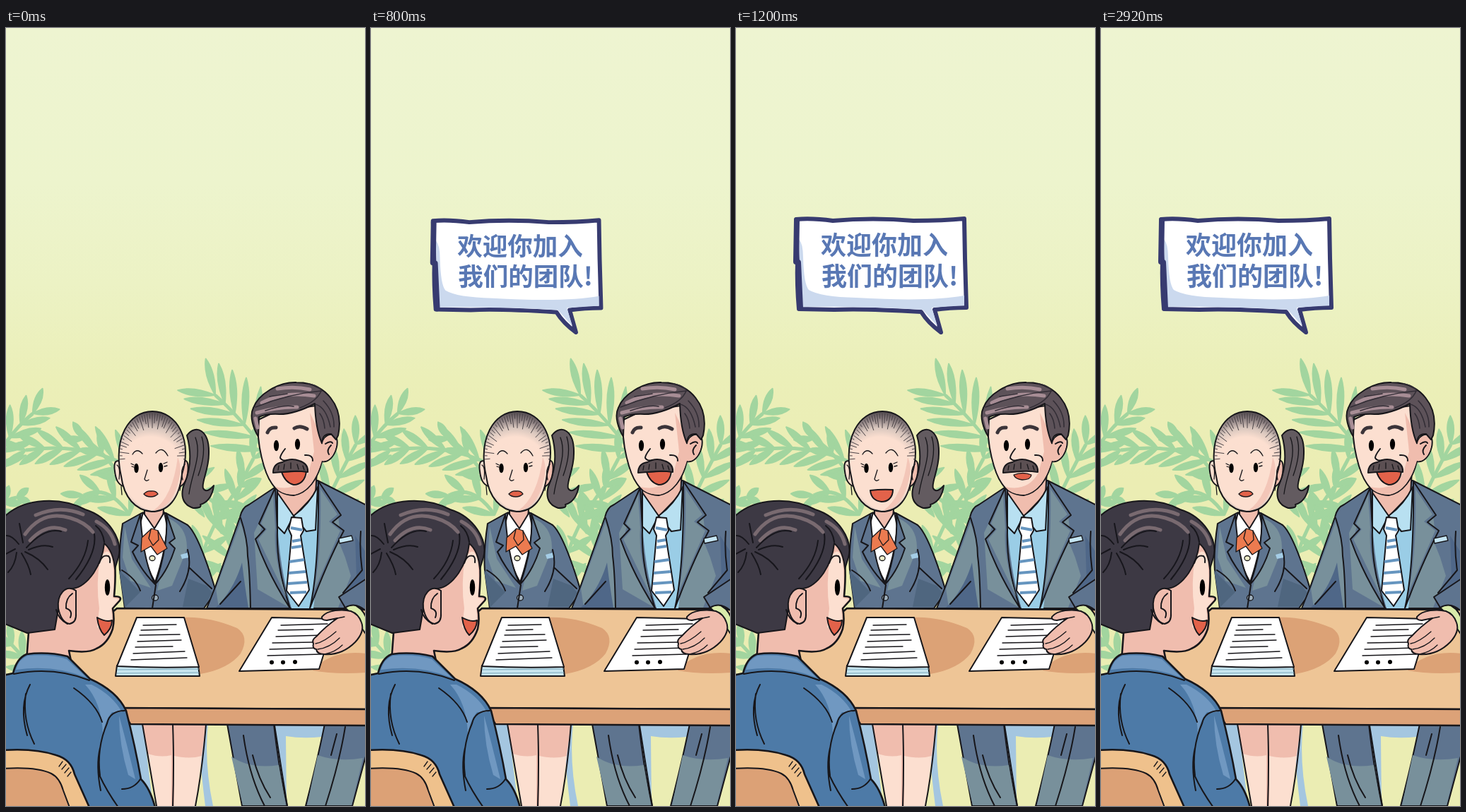
These frames come from a looping animation (508x1102 px, 3000 ms). An HTML page:

```html
<!DOCTYPE html>
<html lang="zh">
<head>
<meta charset="utf-8">
<title>Interview</title>
<style>
html, body { margin: 0; width: 100%; height: 100%; overflow: hidden; background: #ecedb1; }
svg { display: block; width: 508px; height: 1102px; }
.ink { stroke: #17161a; stroke-width: 2; stroke-linejoin: round; stroke-linecap: round; }
.line { fill: none; }
.thin { stroke-width: 1.3; }
.bold { stroke-width: 2.6; }
.skin { fill: #fcdfd0; }
.blush { fill: #f0bdae; }
.suit { fill: #5e748f; }
.grey { fill: #78909b; }
.deep { fill: #4f6788; }
.lip { fill: #e2624a; }
#leaves { fill: #a2d59f; stroke: #a2d59f; stroke-linejoin: round; }
#strands { fill: none; stroke: #4a4347; }

/* Anchored at the tip of the tail */
#bubble { transform-origin: 290px 435px; animation: pop 3s linear infinite; }
@keyframes pop {
  0%, 15.27% { transform: scale(0); }
  29.17% { transform: scale(1.2); }
  36.17%, 100% { transform: scale(1); }
}
#bubble text { font: 700 36px "Noto Sans CJK SC", "Noto Sans CJK", sans-serif; fill: #5978b4; }

.her.open { animation: herTalk 3s step-end infinite; }
.her.shut { animation: herRest 3s step-end infinite; }
.his.open { animation: hisTalk 3s step-end infinite; }
.his.shut { animation: hisRest 3s step-end infinite; }
@keyframes herTalk {
  0%, 25.333%, 46.667%, 66.667%, 73.333%, 93.333% { opacity: 0; }
  12%, 33.333%, 54.667%, 72%, 81.333% { opacity: 1; }
}
@keyframes herRest {
  0%, 25.333%, 46.667%, 66.667%, 73.333%, 93.333% { opacity: 1; }
  12%, 33.333%, 54.667%, 72%, 81.333% { opacity: 0; }
}
@keyframes hisTalk {
  0%, 21.333%, 42.667%, 64%, 90.667% { opacity: 1; }
  10.667%, 32%, 53.333%, 80% { opacity: 0; }
}
@keyframes hisRest {
  0%, 21.333%, 42.667%, 64%, 90.667% { opacity: 0; }
  10.667%, 32%, 53.333%, 80% { opacity: 1; }
}
</style>
</head>
<body>
<svg viewBox="0 0 508 1102">
<defs>
  <linearGradient id="sky" x1="0" y1="0" x2="0" y2="1">
    <stop offset="0" stop-color="#eef4d1"/>
    <stop offset=".2" stop-color="#edf4cd"/>
    <stop offset=".33" stop-color="#ecf2c4"/>
    <stop offset=".45" stop-color="#ebefb8"/>
    <stop offset=".58" stop-color="#ebedb3"/>
    <stop offset="1" stop-color="#ebedb3"/>
  </linearGradient>
  <radialGradient id="scalp" gradientUnits="userSpaceOnUse" cx="204" cy="625" r="82">
    <stop offset=".56" stop-color="#fcdfd0"/>
    <stop offset=".72" stop-color="#d8c6bd"/>
    <stop offset=".88" stop-color="#85797b"/>
    <stop offset="1" stop-color="#4d464a"/>
  </radialGradient>
</defs>
<rect width="508" height="1102" fill="url(#sky)"/>
<g id="leaves"></g>

<!-- seats behind the table -->
<path fill="#a4c6e0" d="M176 985H194L208 1102H196ZM272 985H286Q280 1040 293 1102H282Q274 1040 272 985ZM380 986H452L447 1004Q420 1007 396 1003L397 1102H386Z"/>

<!-- legs -->
<path class="blush" d="M193 985H283L268 1102H213Z"/>
<path class="skin" d="M201 1028Q218 1034 234 1030V1102H213ZM238 1031Q260 1036 277 1031L268 1102H238Z"/>
<path class="ink line" d="M193 986L213 1102M236 986Q238 1040 236 1102M283 986Q278 1050 268 1102"/>
<path class="suit ink" d="M313 986H379Q386 1050 398 1102H334ZM451 986H510V1028L490 1102H424Q440 1040 451 986Z"/>
<path class="grey" d="M319 1032Q345 1050 386 1044L396 1101H335ZM441 1030Q470 1040 505 1034L489 1101H426Z"/>
<path class="ink line" d="M336 1002Q344 1060 366 1102M480 990Q472 1040 452 1102M380 988L398 1102M349 1030Q357 1064 374 1090M468 1000L460 1030"/>

<!-- woman -->
<g>
  <path class="ink" fill="#635b60" d="M256 577C269 560 288 570 287 603C287 626 276 644 279 652C283 659 290 653 294 648C292 665 283 673 275 675Q278 680 265 680C249 675 246 661 253 644C260 627 264 606 256 577Z"/>
  <path class="ink line thin" d="M268 580C278 606 262 633 259 660M277 579Q284 601 272 634"/>
  <path class="suit ink" d="M192 687L165 702Q159 742 161 768L168 822H280L297 798Q273 718 257 704L226 687Z"/>
  <path class="grey" d="M229 694Q257 706 256 738L235 790L214 797L226 740ZM168 706L178 752L205 793L176 783L165 750Z"/>
  <path fill="#4f667f" d="M160 768L190 799L168 821ZM258 780L284 790L292 800L280 820H250Z"/>
  <path class="blush ink" d="M196 668V697L209 710L222 695L224 668Z"/>
  <path fill="#fff" class="ink" d="M194 686L188 710Q195 758 211 785Q226 741 228 706L224 686L210 709Z"/>
  <path class="suit ink" d="M190 689L177 728L187 733L179 742Q191 768 211 788Q194 755 190 689ZM227 688L239 723L231 729L239 737Q229 769 211 788Q230 735 227 688Z"/>
  <path fill="#ec7b50" class="ink thin" d="M206 709L192 722L191 742L205 734L214 746L228 737L215 712Z"/>
  <path class="ink line thin" d="M205 710L202 723L208 733L216 725L215 712"/>
  <ellipse class="ink thin" fill="#f1f0ca" cx="207" cy="751" rx="4" ry="3.5"/>
  <ellipse class="ink thin" fill="#9fb0bd" cx="211" cy="807" rx="4.5" ry="4"/>
  <path fill="#a4cde6" d="M247 746L258 743L259 750L249 752Z"/>
  <path class="ink line" d="M257 739Q265 768 246 798M260 765L291 794M164 768Q184 780 190 797M212 789L207 822"/>
  <path class="skin ink" d="M165 617C155 608 152 616 154 628Q156 646 166 649Z"/>
  <path class="blush ink" d="M246 616C257 607 259 617 257 631Q254 648 244 650Z"/>
  <path class="ink" fill="url(#scalp)" d="M163 635C151 581 174 543 207 543C242 543 264 583 249 632C245 668 229 685 206 685C183 683 167 665 163 635Z"/>
  <path class="skin" d="M166 612C171 594 186 588 208 588C229 588 243 597 247 617C248 650 233 682 207 683C184 681 168 660 166 612Z"/>
  <path class="blush" d="M243 608Q248 618 246 632C242 660 229 682 208 684Q236 664 243 608Z" opacity=".7"/>
  <g id="strands"></g>
  <path class="ink line thin" d="M179 604Q185 594 193 603M212 602Q221 591 229 606M177 617L181 619M223 617L228 615M178 621L181 622M224 621L228 620M200 626L196 639Q198 643 202 640M163 649L164 661M247 649L246 655M157 619Q162 622 160 639M253 618Q246 626 250 640"/>
  <ellipse cx="184.500" cy="623.500" rx="3.200" ry="6.800"/>
  <ellipse cx="219" cy="622.500" rx="3.200" ry="6.800"/>
  <path class="her shut lip ink thin" d="M195 660Q200 655 205 656Q212 655 215 660Q211 664 205 664Q198 664 195 660Z"/>
  <path class="her open lip ink" d="M190 655Q206 653 222 654C222 667 213 671 206 671C196 670 191 664 190 655Z"/>
</g>

<!-- man -->
<g>
  <path class="suit ink" d="M383 649L344 675Q334 679 331 693L296 792L284 822H510V676L441 641Z"/>
  <path class="grey" d="M332 700L342 734L347 821H301L297 794ZM377 661L360 713L369 756L401 821L356 795L351 715ZM443 652L470 690L473 718L444 783L434 821H470L488 776L480 750L468 720Z"/>
  <path class="deep" d="M334 757Q323 795 297 821H343Q337 785 334 757ZM494 719L510 744V798L478 803L496 779Z"/>
  <path fill="#9acde6" d="M384 657Q381 745 404 822H435Q445 750 441 650Z"/>
  <path class="blush ink" d="M385 635L384 662L406 693L438 660L440 626Z"/>
  <path fill="#b8e0f1" class="ink" d="M384 658L384 706L394 716L407 691L425 713L438 711L441 650Q429 675 407 691Z"/>
  <path fill="#fff" class="ink" d="M404 693L418 694L421 712L417 719L429 796L414 819L397 797L404 719L400 710Z"/>
  <path fill="none" stroke="#6595bf" stroke-width="4" d="M403 708L419 711M405 727L417 725M404 736L418 734M401 756L422 753M400 772L424 770M399 787L426 785M402 800L425 799"/>
  <path class="suit ink" d="M381 651L358 702L366 710L353 724Q371 774 402 822Q382 762 384 711ZM442 642L474 690L462 700L478 712Q454 758 430 822Q443 767 442 642Z"/>
  <path class="grey" d="M378 661L361 702L369 710L357 724L397 806Q378 750 381 708ZM445 653L469 689L457 699L473 712L436 797Q447 735 445 653Z"/>
  <path fill="#c5e5f3" class="ink thin" d="M471 723L489 719L491 726L472 730Z"/>
  <path class="ink line" d="M332 694Q342 724 342 748Q345 770 346 822M332 784L303 816M502 713Q500 741 504 768L477 800"/>
  <path class="skin ink" d="M357 555C354 590 366 631 376 645Q386 661 407 662C427 659 441 639 447 614C465 618 476 580 463 576Q451 574 447 590L438 535L380 544Z"/>
  <path class="blush" d="M430 545L440 565L447 590Q451 575 463 578C473 589 462 616 447 613C440 638 427 657 409 661Q390 662 381 650Q413 657 428 630L436 600L433 572Z"/>
  <path class="ink" fill="#5d5259" d="M357 579C350 567 344 550 350 538C357 519 385 501 411 502C452 502 479 535 470 577L467 583L460 575Q448 574 447 588Q438 568 437 532Q409 547 387 547Q369 546 358 551Z"/>
  <path fill="none" stroke="#a78d95" stroke-width="5" stroke-linecap="round" d="M362 531Q392 514 436 521M384 511Q408 507 430 512M355 545Q386 536 412 537M353 553L356 566"/>
  <path fill="none" stroke="#332e36" stroke-width="1.600" stroke-linecap="round" d="M353 537Q400 518 446 514Q440 529 416 538M438 533Q453 537 459 565M449 528Q465 545 464 565M373 522L398 518M367 542Q393 533 407 536M444 546Q450 554 451 567M447 514Q442 506 428 504"/>
  <path class="ink line" d="M452 589Q460 584 462 588M460 591Q453 598 457 604M395 596Q388 605 388 609Q391 614 398 612M423 605Q434 604 434 613"/>
  <path fill="none" stroke="#3b3439" stroke-width="5" stroke-linecap="round" d="M370 573Q373 565 382 566M408 567Q416 562 426 568"/>
  <ellipse cx="382.500" cy="591.500" rx="3.600" ry="7.800"/>
  <ellipse cx="412.500" cy="589.500" rx="3.600" ry="7.800"/>
  <path class="his shut lip ink thin" d="M393 633Q406 628 418 633Q417 640 405 640Q395 639 393 633Z"/>
  <path class="his open lip ink" d="M390 629L425 627C424 641 416 647 407 647Q395 644 390 629Z"/>
  <path class="ink" fill="#5c5053" d="M378 630Q378 617 391 615Q403 608 415 613Q428 617 427 629Q414 627 403 628Q390 629 378 630Z"/>
  <path class="ink line thin" d="M386 620L385 626M394 618L393 625M403 616V624M412 618L414 625M420 620L422 626"/>
</g>

<!-- table -->
<path fill="#eec596" class="ink bold" d="M157 822L510 824V965L88 963V880Z"/>
<path fill="#dca278" class="ink bold" d="M162 963L510 965V988L176 986Z"/>
<path fill="#dca276" d="M250 835Q286 833 327 850Q345 862 332 886Q315 908 275 915ZM434 910Q460 880 510 886V913Q465 916 434 910Z"/>
<path fill="#c9e6ef" class="ink" d="M157 903L155 918H274L272 903Z"/>
<path fill="none" stroke="#7ba9bd" d="M157 909L273 908M157 914L273 913"/>
<path fill="#fff" class="ink" d="M185 835H252L273 905Q215 907 157 904Z"/>
<path class="ink line thin" d="M194 846L241 845M191 853L229 852M189 860L246 859M186 869L248 867M183 877L236 876M180 886L253 883M177 895L256 892"/>
<path fill="#fff" class="ink" d="M376 835L465 837L443 908L330 911Z"/>
<path class="ink line thin" d="M389 846L455 844M385 853L435 852M382 862L449 860M377 871L434 870M373 880L444 878M370 889L446 887"/>
<g><circle cx="376" cy="898.500" r="3"/><circle cx="392" cy="898.500" r="3"/><circle cx="409" cy="898" r="3"/></g>

<!-- hand on the sheet -->
<path fill="#d9ebaa" class="ink" d="M479 820L488 815Q504 820 510 836V860L493 834Z"/>
<path class="suit ink" d="M471 806L510 780V826Q494 812 480 821Z"/>
<path class="blush ink" d="M488 826C476 823 455 824 447 834Q446 839 454 839L469 836Q453 847 439 862Q432 867 435 872Q433 879 439 880Q440 887 450 887Q475 889 494 870Q508 855 503 842Q499 830 488 826Z"/>
<path class="ink line thin" d="M469 836L479 834M438 872Q450 870 467 855M441 880Q458 878 472 864M451 887Q466 884 476 874"/>

<!-- young man -->
<g>
  <path class="blush ink bold" d="M33 842L29 896L94 906L89 882Q117 886 128 879Q144 872 151 851Q154 837 151 822L161 811Q165 805 153 805Q157 764 151 737L128 706Q60 720 33 842Z"/>
  <path class="skin" d="M133 751Q146 730 151 755Q154 780 151 807L160 809L149 822Q151 839 148 850Q135 856 129 848L132 822Q127 788 133 751Z"/>
  <path class="ink" fill="#3d3944" d="M-4 694C26 663 80 665 112 682C145 692 166 725 159 750L154 766Q152 741 139 730Q137 752 124 772Q110 792 95 794C80 793 77 806 74 823L69 852L30 857L-4 843Z"/>
  <path fill="none" stroke="#796a70" stroke-width="5" stroke-linecap="round" d="M27 717Q52 682 91 694Q112 700 123 714M42 690Q77 675 109 689M34 726Q58 700 84 711M128 699Q149 710 154 731"/>
  <path fill="none" stroke="#17161c" stroke-width="2" stroke-linecap="round" d="M29 736Q55 707 78 713M32 739Q52 730 66 735M27 742Q48 751 59 767M22 744Q33 762 35 774M15 743Q13 761 3 771M13 738L-2 746M18 731Q8 718 0 719M24 729L19 702M125 717Q129 744 99 781M116 726Q113 754 89 780M139 728Q137 713 127 705"/>
  <path class="blush ink" d="M99 797C84 787 72 803 74 822Q78 842 90 844Q100 842 99 829Z"/>
  <path class="ink line" d="M94 801Q84 808 85 822Q95 825 91 835M132 758Q136 745 145 748Q148 751 147 757M71 824Q74 837 87 844"/>
  <ellipse cx="143.500" cy="792.500" rx="3.700" ry="11.500"/>
  <path class="lip ink" d="M129 835Q141 842 150 839Q150 851 139 860Q131 852 129 835Z"/>
  <path fill="#4d7aa7" class="ink bold" d="M-4 917L10 914Q15 893 29 887Q58 883 87 890L119 922Q157 939 170 967Q183 1018 191 1064Q204 1077 211 1104H-4Z"/>
  <path fill="#7098c1" d="M14 909Q18 894 31 889Q65 887 86 894L114 920Q67 901 14 909ZM121 930Q151 945 164 969L150 969Q140 980 137 1001Q136 956 112 930ZM160 974Q170 1010 183 1064L173 1058Q160 1015 160 974Z"/>
  <path class="ink line" d="M11 915Q67 904 118 924M34 930Q18 960 30 1002M28 943Q23 980 40 1014M168 967Q147 967 143 985Q128 1020 133 1059M133 1020Q127 1045 134 1080M96 935Q128 957 136 983M190 1064Q181 1078 164 1078M132 1058Q142 1080 159 1104"/>
  <path fill="#efc18c" class="ink bold" d="M-4 1023Q41 1020 71 1030Q92 1036 97 1057L118 1104H-4Z"/>
  <path fill="#dca176" class="ink" d="M-4 1049Q43 1046 64 1056Q76 1062 81 1080L90 1104H-4Z"/>
  <path class="ink line thin" d="M75 1046L80 1039M79 1050L85 1043M83 1055L89 1048M87 1060L92 1054"/>
</g>

<g id="bubble">
  <path fill="#fff" stroke="#373b70" stroke-width="6" stroke-linejoin="round" d="M85 271Q108 269 137 273Q194 268 251 273Q294 273 323 270L324 326L326 396Q302 396 281 399L290 431Q272 418 262 402Q180 397 139 399L89 398Q86 363 87 330Z"/>
  <path fill="#cbd9ee" d="M89 299Q95 306 95 325Q96 363 103 371Q120 381 170 382Q274 388 323 379L323 393L277 396L285 422L264 399Q180 394 92 395Z"/>
  <path fill="none" stroke="#373b70" stroke-width="8" stroke-linecap="round" d="M86 273L85 331M88 332L91 397"/>
  <text x="120" y="320.500">欢迎你加入</text>
  <text x="121" y="364.500">我们的团队!</text>
</g>
</svg>
<script>
const add = (id, d, attrs) => {
  const p = document.createElementNS("http://www.w3.org/2000/svg", "path");
  p.setAttribute("d", d);
  for (const k in attrs) p.setAttribute(k, attrs[k]);
  document.getElementById(id).append(p);
};

const leaflet = (x, y, a, len, w) => {
  const c = Math.cos(a), s = Math.sin(a);
  const at = (u, v) => `${(x + c * u - s * v).toFixed(1)} ${(y + s * u + c * v).toFixed(1)}`;
  return `M${at(0, 0)}Q${at(len * .6, w)} ${at(len, 0)}Q${at(len * .6, -w)} ${at(0, 0)}Z`;
};

// Leaflets in pairs along a quadratic stem
function frond(x0, y0, cx, cy, x1, y1, pairs, len, spread = .75) {
  let d = "";
  for (let i = 0; i <= pairs; i++) {
    const t = i / pairs, u = 1 - t;
    const x = u * u * x0 + 2 * u * t * cx + t * t * x1;
    const y = u * u * y0 + 2 * u * t * cy + t * t * y1;
    const a = Math.atan2(u * (cy - y0) + t * (y1 - cy), u * (cx - x0) + t * (x1 - cx));
    const l = len * (1 - .3 * t);
    for (const side of [-1, 1]) d += leaflet(x, y, a + side * spread * (1 - .3 * t), l, 9);
  }
  add("leaves", d, { "stroke-width": 2 });
  add("leaves", `M${x0} ${y0}Q${cx} ${cy} ${x1} ${y1}`, { "stroke-width": 5, fill: "none" });
}

frond(-22, 625, 2, 575, 38, 546, 4, 54);
frond(175, 622, 110, 586, 28, 598, 6, 56, .7);
frond(165, 640, 135, 595, 110, 582, 2, 40);
frond(366, 598, 330, 550, 296, 520, 5, 76, .85);
frond(445, 690, 470, 635, 495, 590, 4, 58);
frond(330, 780, 300, 700, 350, 610, 6, 58);
frond(250, 650, 300, 660, 330, 720, 4, 52);
frond(270, 790, 275, 720, 330, 650, 3, 46);
frond(175, 690, 145, 645, 110, 662, 3, 46);
frond(-20, 690, -5, 668, 15, 665, 2, 30);
frond(40, 910, 15, 880, -5, 860, 3, 40);

// Combed-back hair radiating from the brow
let strands = "";
for (let i = 0; i <= 40; i++) {
  const a = Math.PI * (.98 + 1.04 * i / 40);
  const inner = .74 + .12 * Math.sin(i * 2.4) + .08 * Math.abs(Math.cos(a));
  const at = k => `${(207 + 47 * k * Math.cos(a)).toFixed(1)} ${(607 + 62 * k * Math.sin(a)).toFixed(1)}`;
  strands += `M${at(.99)}L${at(inner)}`;
}
add("strands", strands, { "stroke-width": 1 });
</script>
</body>
</html>
```
